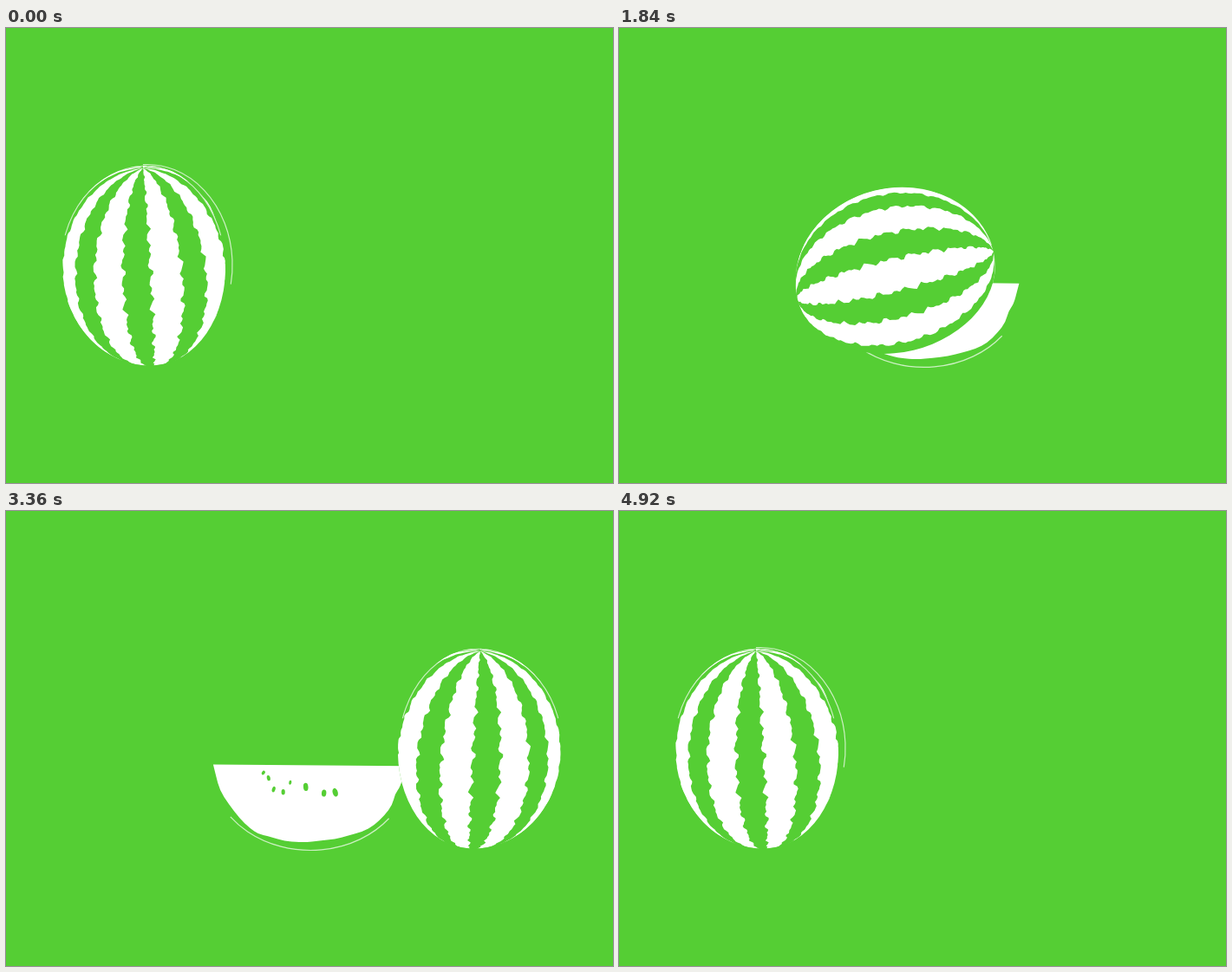
These frames come from a looping animation (700 by 525 pixels, 5 s). An HTML page with a canvas:

```html
<!DOCTYPE html>
<html lang="en">
<head>
<meta charset="utf-8">
<title>Rolling watermelon</title>
<style>
  html, body { margin: 0; width: 100%; height: 100%; overflow: hidden; background: #55ce34; }
  canvas { display: block; width: 700px; height: 525px; }
</style>
</head>
<body>
<canvas id="stage" width="700" height="525"></canvas>
<script>
const ctx = document.getElementById('stage').getContext('2d');
const GREEN = '#55ce34', WHITE = '#fff';
const LOOP = 5000, STEP = 40, HOME = 4920;
const { PI, sin, cos, tan, abs, exp, hypot, acos } = Math;
const rad = deg => deg * PI / 180;
const clamp = (v, lo, hi) => Math.min(hi, Math.max(lo, v));

// Melon: an ellipsoid seen from slightly above
const LONG = 116.5, WIDE = 100.5, CUT = 89, ELEVATION = rad(15);
const STRIPES = 9, STRIPE_HALF = rad(10.7);
const LEFT_X = 164, RIGHT_X = 541;

// Slice: outline below the flat edge, relative to the middle of that edge
const RIND = [
  [-112, 0], [-109, 12], [-104, 30], [-94, 45], [-81, 62], [-69, 73], [-59, 80],
  [-48, 82], [-38, 85], [-26, 88], [-6, 89], [11, 87], [29, 85], [44, 81], [61, 76],
  [74, 69], [86, 57], [95, 45], [98, 32], [104, 24], [108, 8], [110, 0]
];
const SEEDS = [ // x, y, rx, ry, tilt
  [-54, 9, 1.8, 2.6, 0.6], [-48, 15, 2, 3.2, -0.2], [-42, 28, 1.9, 3.4, 0.3],
  [-31, 31, 2.1, 3.2, 0], [-23, 20, 1.5, 2.5, 0.2], [-5, 25, 2.8, 4.6, -0.1],
  [16, 32, 2.7, 4, 0.1], [29, 31, 3, 5, -0.3]
];

// Cubic easing with handles at (x1, 0) and (x2, 1)
function ease(s, x1 = 0.58, x2 = 0.47) {
  let lo = 0, hi = 1;
  for (let i = 0; i < 24; i++) {
    const m = (lo + hi) / 2, n = 1 - m;
    if (3 * m * n * n * x1 + 3 * m * m * n * x2 + m ** 3 < s) lo = m; else hi = m;
  }
  return lo * lo * (3 - 2 * lo);
}

// Share of the way from the left resting place to the right one
function melonProgress(t) {
  return t < 3000 ? ease(clamp((t - 1180) / 1380, 0, 1))
                  : 1 - ease(clamp((t - 3580) / 1310, 0, 1));
}

// Rotation of the slice: it tips out of the melon, then rocks to rest
function sliceAngle(t) {
  const second = t >= 2500;
  const side = second ? 1 : -1;
  const start = second ? 2500 : 20;
  const fall = second ? 580 : 600;
  const swing = second ? 0.235 : 0.14;
  const dt = t - start;
  if (dt < fall) {
    const s = clamp(dt / fall, 0, 1) ** 1.25;
    return side * PI / 2 * (1 - s * s * (3 - 2 * s) - 0.8 * s * s * (s - 1));
  }
  const d = dt - fall;
  return -side * swing * exp(-0.002 * d) * sin(PI * d / 275);
}

function drawSlice(angle) {
  const lift = 20 * (1 - exp(-((angle / 0.2) ** 2)));
  ctx.save();
  ctx.translate(350 + 119 * angle, 293.5 - lift);
  ctx.rotate(angle);

  ctx.fillStyle = WHITE;
  ctx.beginPath();
  ctx.moveTo(...RIND[0]);
  for (let i = 1; i < RIND.length - 1; i++) {
    const [x, y] = RIND[i], [nx, ny] = RIND[i + 1];
    ctx.quadraticCurveTo(x, y, (x + nx) / 2, (y + ny) / 2);
  }
  ctx.lineTo(110, 0);
  ctx.fill();

  ctx.fillStyle = GREEN;
  for (const [x, y, rx, ry, tilt] of SEEDS) {
    ctx.beginPath();
    ctx.ellipse(x, y, rx, ry, tilt, 0, 2 * PI);
    ctx.fill();
  }

  const shift = 41 * angle / (PI / 2);
  ctx.strokeStyle = 'rgba(255,255,255,0.7)';
  ctx.lineWidth = 1.2;
  ctx.beginPath();
  ctx.ellipse(0, 0, 116, 98, 0, rad(38 + shift), rad(142 + shift));
  ctx.stroke();
  ctx.restore();
}

const ragged = (lat, seed) =>
  0.017 * sin(lat * 27 + seed * 2.3) + 0.015 * sin(lat * 43 + seed * 5.1) +
  0.011 * sin(lat * 71 + seed * 3.7);

function bodyPath(height, left, right) {
  ctx.beginPath();
  ctx.ellipse(0, 0, right, height, 0, -PI / 2, PI / 2);
  ctx.ellipse(0, 0, left, height, 0, PI / 2, 3 * PI / 2);
  ctx.closePath();
}

function drawStripe(index, lon, tilt) {
  const edge = (lat, side) => {
    const limit = acos(clamp(-WIDE / LONG * tan(lat) * tan(tilt), -1, 1));
    const raw = lon + side * STRIPE_HALF + ragged(lat, index * 2 + side);
    const l = clamp(raw, -limit, limit);
    const up = LONG * sin(lat) * cos(tilt) - WIDE * cos(lat) * cos(l) * sin(tilt);
    ctx.lineTo(WIDE * cos(lat) * sin(l), -up);
  };
  const n = 110, latAt = i => (i / n - 0.5) * (PI - 0.002);
  ctx.beginPath();
  for (let i = 0; i <= n; i++) edge(latAt(i), -1);
  for (let i = n; i >= 0; i--) edge(latAt(i), 1);
  ctx.fill();
}

function drawMelon(progress, whole) {
  const turn = progress + 0.03 * sin(2 * PI * progress);
  const angle = rad(-3 + 186 * turn);
  const tilt = ELEVATION * cos(angle);
  const height = hypot(LONG * cos(tilt), WIDE * sin(tilt));
  const right = whole ? WIDE : CUT;
  const cx = LEFT_X + (RIGHT_X - LEFT_X) * progress;
  const cy = 273.5 + 12 * abs(sin(angle));
  const spin = rad(12 - 40 * turn ** 1.4);

  ctx.save();
  ctx.translate(cx, cy);
  ctx.rotate(angle);
  bodyPath(height, WIDE, right);
  ctx.fillStyle = GREEN;
  ctx.fill();
  ctx.clip();
  ctx.fillStyle = WHITE;
  for (let k = -4; k <= 4; k++) drawStripe(k, spin + k * 2 * PI / STRIPES, tilt);
  ctx.restore();

  // Thin rim along the upper side
  ctx.save();
  ctx.beginPath();
  ctx.rect(0, 0, 700, cy - 35);
  ctx.clip();
  ctx.translate(cx, cy);
  ctx.rotate(angle);
  bodyPath(height - 0.5, WIDE - 0.5, right - 0.5);
  ctx.strokeStyle = 'rgba(255,255,255,0.7)';
  ctx.lineWidth = 1.1;
  ctx.stroke();
  ctx.restore();
}

function draw(t) {
  ctx.fillStyle = GREEN;
  ctx.fillRect(0, 0, 700, 525);
  const progress = melonProgress(t);
  // The melon picks the slice up halfway across
  const whole = t < 2500 ? progress >= 0.5 : t > 3580 && progress <= 0.5;
  if (!whole) drawSlice(sliceAngle(t));
  drawMelon(progress, whole);
}

const begin = performance.now();
function tick() {
  const t = Math.floor((performance.now() - begin) % LOOP / STEP) * STEP;
  draw(t < HOME ? t : 0);
  requestAnimationFrame(tick);
}
tick();
</script>
</body>
</html>
```
